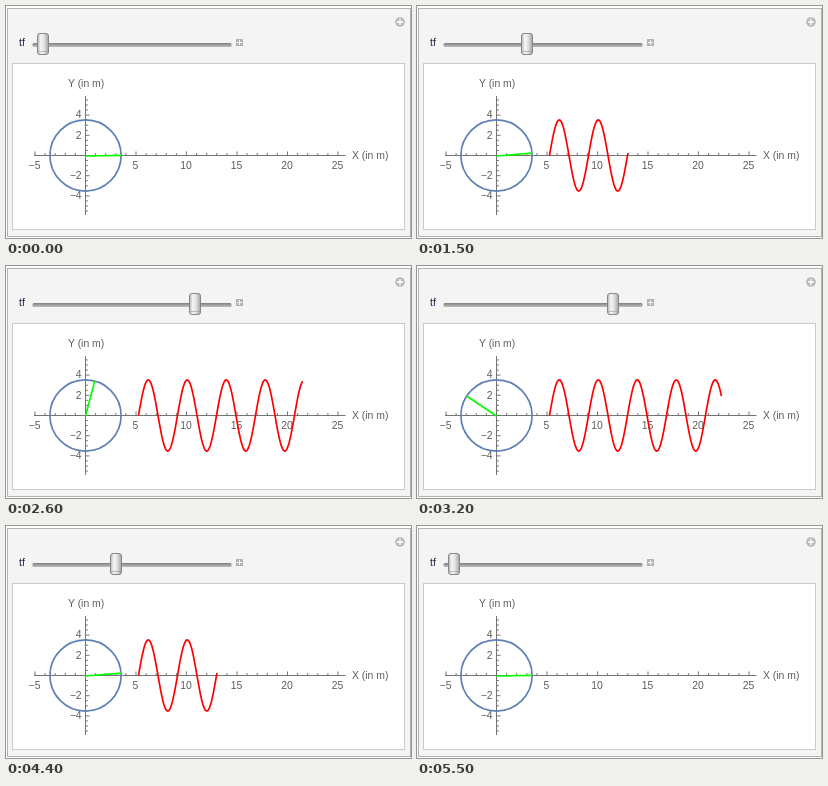
Write an HTML page that moves like this. It is 405 px wide and 232 px high and loops after 6000 ms.

```html
<!DOCTYPE html>
<html>
<head>
<meta charset="utf-8">
<style>
html, body { margin: 0; width: 100%; height: 100%; overflow: hidden; background: #fff; }
svg { display: block; width: 405px; height: 232px; }
text { font: 10.4px "Liberation Sans", Arial, sans-serif; fill: #5c5c5c; }
</style>
</head>
<body>
<svg viewBox="0 0 405 232">
  <defs>
    <linearGradient id="metal">
      <stop offset="0" stop-color="#b4b4b4"/>
      <stop offset=".3" stop-color="#f6f6f6"/>
      <stop offset=".6" stop-color="#e2e2e2"/>
      <stop offset="1" stop-color="#a2a2a2"/>
    </linearGradient>
    <linearGradient id="groove" x2="0" y2="1">
      <stop offset="0" stop-color="#7e7e7e"/>
      <stop offset=".5" stop-color="#a0a0a0"/>
      <stop offset="1" stop-color="#bdbdbd"/>
    </linearGradient>
  </defs>

  <rect x="1.5" y="2.5" width="403" height="228" fill="#f4f4f4" stroke="#b3b3b3"/>
  <rect x="6.5" y="57.5" width="392" height="166" fill="#fff" stroke="#cbcbcb"/>
  <circle cx="394" cy="16" r="4.8" fill="#b9b9b9"/>
  <path d="M391 16h6M394 13v6" stroke="#fff" stroke-width="1.4"/>
  <rect x="230" y="33" width="7" height="7" fill="#b2b2b2"/>
  <path d="M231 36.5h5M233.5 34v5" stroke="#fff"/>

  <text x="13" y="40" style="fill:#1a1a4d">tf</text>
  <rect x="26.5" y="37" width="199" height="4" rx="1.5" fill="url(#groove)"/>
  <g id="thumb">
    <rect x="-5.5" y="27.5" width="11" height="21" rx="2.5" fill="url(#metal)" stroke="#868686"/>
    <path d="M-4.5 45.5h9" stroke="#8a8a8a" stroke-opacity=".5"/>
  </g>

  <g id="axes" stroke="#666" stroke-width=".9"></g>
  <g id="labels">
    <text x="346" y="153">X (in m)</text>
    <text x="62" y="81">Y (in m)</text>
  </g>
  <g fill="none" stroke-width="1.7">
    <circle cx="79.5" cy="149.5" r="35.6" stroke="#5e81b5"/>
    <path id="wave" stroke="#f00"/>
    <path id="arm" stroke="#0f0"/>
  </g>
</svg>
<script>
const $ = id => document.getElementById(id);
const NS = "http://www.w3.org/2000/svg";
const CX = 79.5, CY = 149.5, R = 35.6, UNIT = 10.1;
const WAVE_X = 132.5, WAVE_LEN = 39;

function label(x, y, n, anchor) {
  const t = document.createElementNS(NS, "text");
  t.setAttribute("x", x);
  t.setAttribute("y", y);
  t.setAttribute("text-anchor", anchor);
  t.textContent = String(n).replace("-", "\u2212");
  $("labels").append(t);
}

function drawAxes() {
  let d = `M28 ${CY}H339.5M${CX} 90V209`;
  for (let n = -5; n <= 25; n++) {
    const x = CX + n * UNIT, major = n % 5 === 0;
    d += `M${x} ${CY}v${major ? -4 : -2.4}`;
    if (major && n) label(x - .5, 162.5, n, "middle");
  }
  for (let n = -11; n <= 11; n++) {
    const y = CY - n * UNIT / 2, major = n % 4 === 0;
    d += `M${CX} ${y}h${major ? 4 : 2.4}`;
    if (major && n) label(75.5, y + 3.2, n / 2, "end");
  }
  const axes = document.createElementNS(NS, "path");
  axes.setAttribute("d", d);
  $("axes").append(axes);
}

// Step 0 rests at the start; steps 1 to 25 advance a fifth of a turn each.
function stepAt(ms) {
  const tick = Math.floor(ms / 100);
  return Math.max(0, Math.min(tick, 59 - tick) - 4);
}

function draw(ms) {
  const k = stepAt(ms % 6000);
  const turns = k ? .0125 + .1998 * (k - 1) : .001;
  const thumbX = k ? 38 + 7.2 * (k - 1) : 37;
  const height = p => R * Math.sin(2 * Math.PI * p);

  $("thumb").setAttribute("transform", `translate(${Math.round(thumbX)} 0)`);
  $("arm").setAttribute("d", `M${CX} ${CY + .5}L${CX + R * Math.cos(2 * Math.PI * turns)} ${CY - height(turns)}`);

  const count = Math.ceil(turns * 40);
  let d = "";
  for (let i = 0; i <= count; i++) {
    const p = turns * i / count;
    d += `${i ? "L" : "M"}${(WAVE_X + WAVE_LEN * p).toFixed(2)} ${(CY - height(p)).toFixed(2)}`;
  }
  $("wave").setAttribute("d", d);
}

drawAxes();
const start = performance.now();
function loop() {
  draw(performance.now() - start);
  requestAnimationFrame(loop);
}
loop();
</script>
</body>
</html>
```
